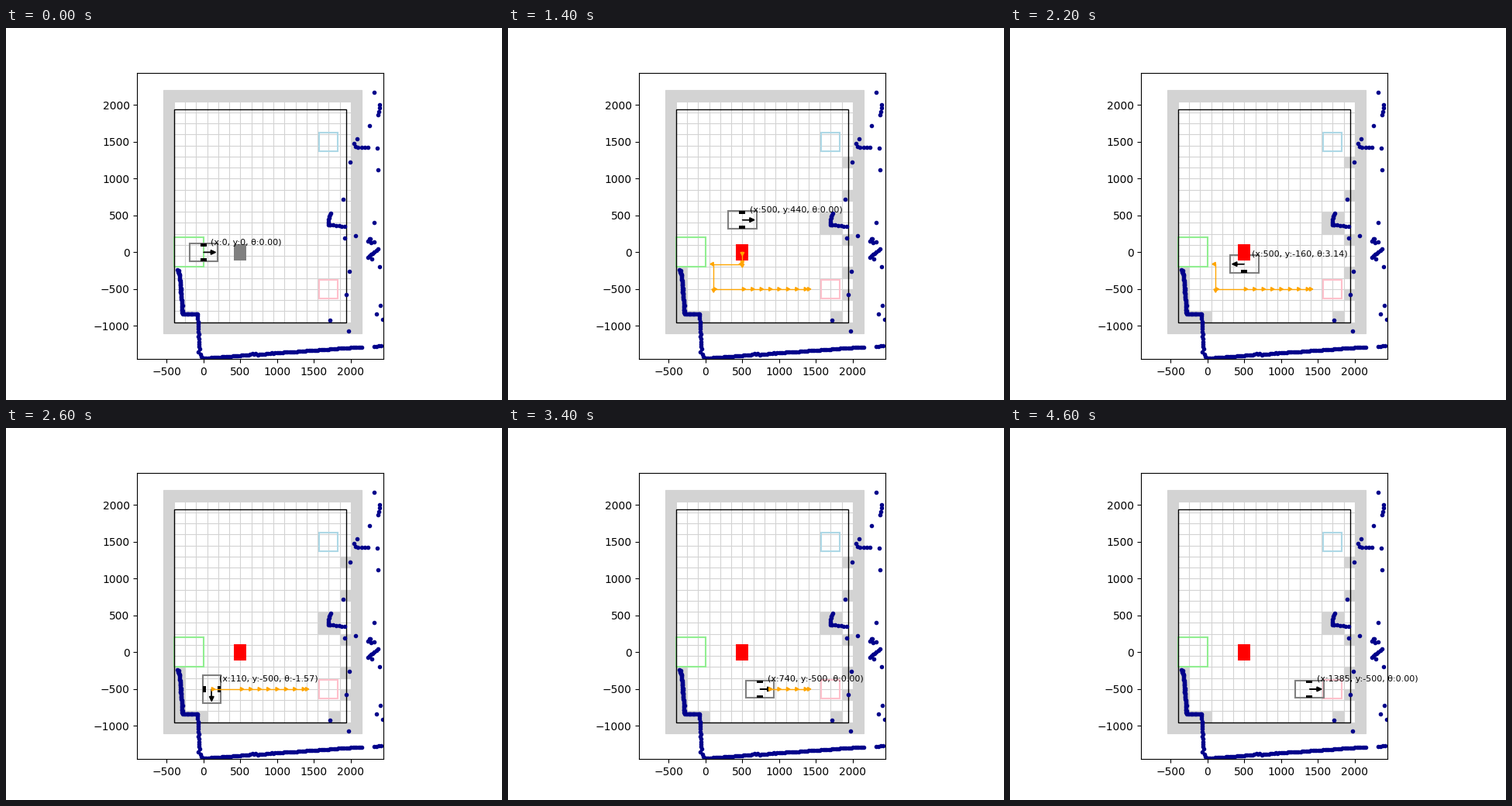
A matplotlib script for the animation above (5 s loop, 640 by 480 pixels).

```python
import math

import matplotlib.pyplot as plt
import numpy as np
from matplotlib.animation import FuncAnimation
from matplotlib.patches import FancyArrow, Polygon, Rectangle

CELL = 150
UP, DOWN, LEFT, RIGHT = math.pi / 2, -math.pi / 2, math.pi, 0.0
rng = np.random.default_rng(4)

# Poses (x, y, heading), one per step
DETOUR = [(60, 440, UP), (500, 440, RIGHT)]
ROUTE = [(500, y, DOWN) for y in (0, -120, -160)]
ROUTE += [(x, -160, LEFT) for x in (500, 110)]
ROUTE += [(110, -500, DOWN), (110, -500, RIGHT)]
ROUTE += [(x, -500, RIGHT) for x in (*range(500, 1341, 120), 1385)]
PLAN = DETOUR + ROUTE


def trail(points, gap, noise=0):
    """Evenly spaced points along a polyline, with optional jitter."""
    x, y = np.array(points, float).T
    s = np.concatenate([[0], np.cumsum(np.hypot(np.diff(x), np.diff(y)))])
    t = np.linspace(0, s[-1], round(s[-1] / gap) + 1)
    dots = np.column_stack([np.interp(t, s, x), np.interp(t, s, y)])
    return dots + rng.normal(0, noise, dots.shape)


def floor_line():
    x = np.arange(-10, 2170, 24)
    y = -1440 + 0.0722 * (x + 10) + 14 * np.exp(-((x - 670) / 40) ** 2)
    return np.column_stack([x, y + rng.normal(0, 3, x.size)])


# Laser scan: hits that block cells, then everything farther away
wall = trail([(-350, -238), (-325, -300), (-284, -838), (-82, -838)], 14, 3)
post = trail([(1723, 530), (1695, 420), (1695, 380), (1720, 368)], 24)
specks = [(1996, 1222), (1896, 720), (1918, 194), (1980, -258),
          (1938, -575), (1722, -922)]
hits = np.vstack([wall, post, specks])
far = np.vstack([
    trail([(-82, -838), (-66, -1160), (-58, -1350), (-10, -1440)], 34, 3),
    floor_line(),
    trail([(1720, 373), (1918, 350)], 43),
    trail([(2044, 1478), (2075, 1425), (2233, 1422)], 40),
    trail([(2396, 2004), (2370, 1867)], 46),
    trail([(2365, 47), (2296, -17), (2233, -69)], 28),
    trail([(2312, -1280), (2417, -1270)], 35),
    rng.normal((2268, 160), (28, 35), (6, 2)),
    [(2317, 2173), (2254, 1720), (2085, 1541), (2355, 1410), (2370, 1120),
     (2322, 405), (2065, 225), (2286, -90), (2386, -195), (2402, -722),
     (2344, -838), (2428, -906), (1975, -1070)],
])

fig, ax = plt.subplots(figsize=(6.4, 4.8), dpi=100)
ax.set_aspect("equal")
ax.set_xlim(-900, 2440)
ax.set_ylim(-1450, 2440)


def box(x, y, w, h, **style):
    return ax.add_patch(Rectangle((x, y), w, h, **style))


def outline(x, y, w, h, color, lw=1.5):
    return box(x, y, w, h, fill=False, edgecolor=color, linewidth=lw)


# Map
gray = dict(color="lightgray", linewidth=0.8)
box(-550, -1100, 2700, 3300, **gray)
box(-400, -950, 2400, 3000, facecolor="white", linewidth=0)
for gx in range(-400, 2001, CELL):
    ax.plot([gx, gx], [-950, 2050], zorder=1, **gray)
for gy in range(-950, 2051, CELL):
    ax.plot([-400, 2000], [gy, gy], zorder=1, **gray)

corner = np.array([-400, -950])
blocked = np.unique((hits - corner) // CELL, axis=0) * CELL + corner
cells = [box(x, y, CELL, CELL, **gray) for x, y in blocked]

outline(-400, -200, 400, 400, "lightgreen")
for cy, color in ((1500, "lightblue"), (-500, "pink")):
    outline(1575, cy - 125, 250, 250, color)
outline(-400, -950, 2340, 2890, "black", 1)
ax.plot(*np.vstack([hits, far]).T, "o", color="darkblue", markersize=3)

moving = []


def keep(patch):
    moving.append(ax.add_patch(patch))


def body_part(pose, offset, w, h, **style):
    """Rectangle in the robot's own axes, shifted sideways by offset."""
    x, y, a = pose
    c, s = math.cos(a), math.sin(a)
    corners = [(i * w / 2, offset + j * h / 2)
               for i, j in ((-1, -1), (1, -1), (1, 1), (-1, 1))]
    keep(Polygon([(x + u * c - v * s, y + u * s + v * c)
                  for u, v in corners], **style))


def arrow(pose, length, head_w, head_l, color):
    x, y, a = pose
    keep(FancyArrow(x, y, length * math.cos(a), length * math.sin(a),
                    width=0.001, head_width=head_w, head_length=head_l,
                    color=color))


def draw_robot(pose):
    body_part(pose, 0, 385, 240, fill=False, edgecolor="gray",
              linewidth=1.5)
    for side in (-100, 100):
        body_part(pose, side, 85, 40, facecolor="black", linewidth=0)
    arrow(pose, 100, 60, 65, "black")
    x, y, a = pose
    moving.append(ax.text(x + 100, y + 100, f"(x:{x}, y:{y}, θ:{a:.2f})",
                          fontsize=8))


def draw_path(poses):
    if not poses:
        return
    xs, ys, _ = zip(*poses)
    moving.extend(ax.plot(xs, ys, color="orange", linewidth=1))
    for pose in poses:
        arrow(pose, 1, 50, 45, "orange")


def state(step):
    """Robot pose and the poses still ahead."""
    if step < 6:
        pose = (0 if step < 2 else 110, 0, RIGHT)
        path = [] if step < 4 else ROUTE if step == 4 else PLAN
        return pose, path
    i = min(step - 6, len(PLAN) - 1)
    return PLAN[i], PLAN[i + 1:]


def update(step):
    while moving:
        moving.pop().remove()
    for cell in cells:
        cell.set_visible(step >= 1)
    pose, path = state(step)
    draw_robot(pose)
    keep(Rectangle((415, -110), 170, 220, linewidth=0,
                   facecolor="red" if step >= 3 else "gray"))
    draw_path(path)
    return moving


anim = FuncAnimation(fig, update, frames=25, interval=200, repeat=True,
                     repeat_delay=0, init_func=lambda: [], blit=False)
plt.show()
```
